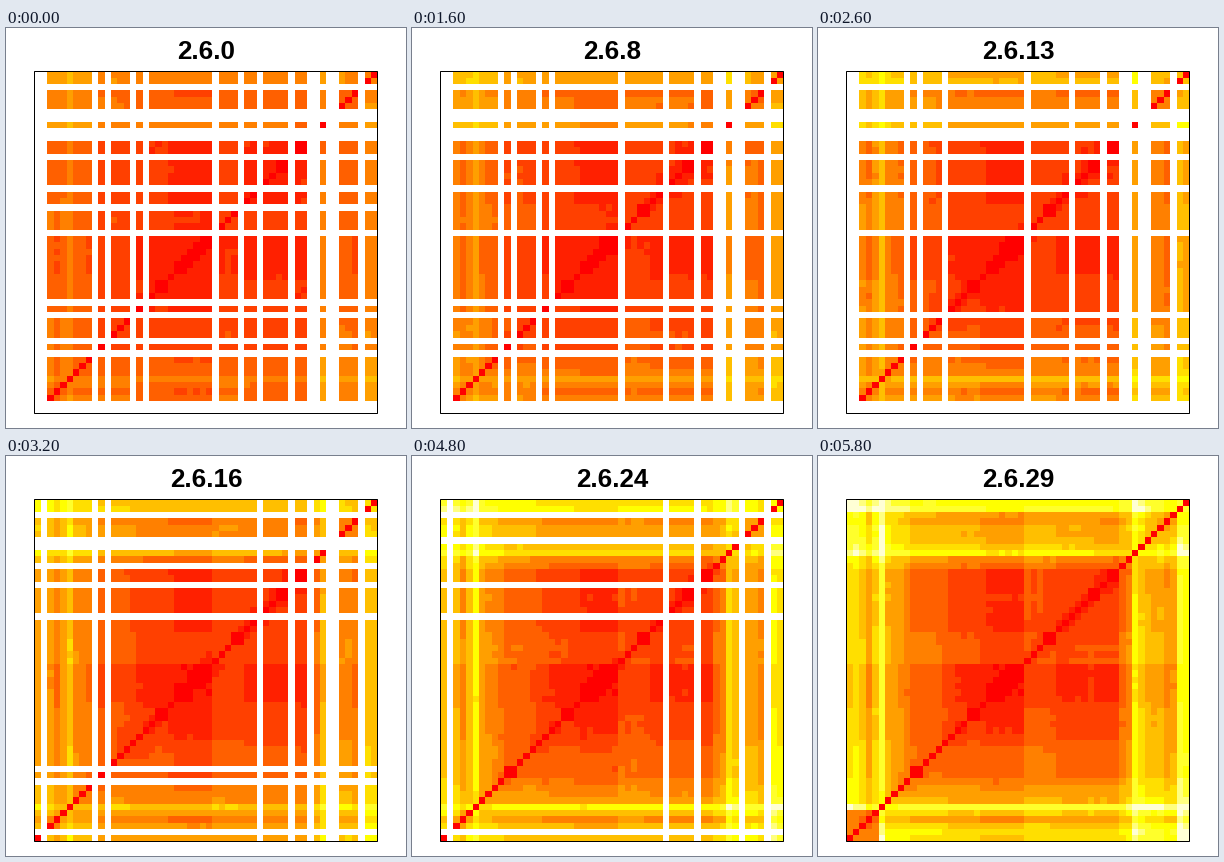
A matplotlib script for the animation above (8000 ms loop, 400x400 px).

```python
import numpy as np
import matplotlib.pyplot as plt
from matplotlib.animation import FuncAnimation
from matplotlib.colors import ListedColormap
from matplotlib.patches import Rectangle

SIZE, DPI = 400, 100
N = 54
LAST = 29          # final version; held until the loop ends
STEPS, STEP_MS = 40, 200
LEFT, RIGHT, TOP, BOTTOM = 28.8, 371.2, 43.2, 385.6

# Key points of the final distance from the common core, by item.
KEYS = [(0, 7.2), (1, 8), (3, 4.5), (4, 6.4), (5, 9.2), (6, 5.6), (8, 4.5),
        (10, 3.2), (14, 3.1), (16, 2.0), (20, 1.8), (22, 0.8), (27, 0.75),
        (28, 2.4), (32, 2.4), (33, 1.7), (42, 1.6), (43, 3.5), (44, 4.4),
        (45, 8), (46, 6.8), (48, 5.2), (49, 6), (50, 4.6), (51, 4.8),
        (52, 8.6), (53, 8.3)]
# Items that first appear in a later version.
ARRIVALS = {5: [32], 11: [17], 14: [0], 15: [15, 28], 16: [44], 17: [43],
            18: [9, 11], 19: [46], 25: [47], 26: [1, 35], 27: [40], 28: [51]}
TWINS = (10, 19, 31, 38, 41)   # items identical to their next neighbour

items = np.arange(N)
rng = np.random.default_rng(26)


def symmetric_noise(scale):
    m = np.triu(rng.normal(0, scale, (N, N)))
    return m + m.T


final = np.interp(items, *zip(*KEYS)) * rng.normal(1, 0.03, N)
noise = symmetric_noise(0.05)
gap = np.abs(np.subtract.outer(items, items))
closeness = 1 - 0.32 * np.exp(-gap / 3)

first = np.zeros(N)
for version, arrived in ARRIVALS.items():
    first[arrived] = version


def heat_colors(n):
    pale = n // 4
    ramp = n - pale
    hot = [(1, k / (ramp - 1), 0) for k in range(ramp)]
    light = [(1, 1, b) for b in np.linspace(0.5 / pale, 1 - 0.5 / pale, pale)]
    return ListedColormap(hot + light)


def levels(version):
    t = version / LAST
    a = final ** (0.67 + 0.33 * t)     # outliers drift away fastest
    p = 1.8
    d = np.add.outer(a ** p, a ** p) ** (1 / p) * closeness + noise
    if version >= 25:
        d[:5, :5] *= 0.55              # the first items form a family
    for i in TWINS:
        d[i, i + 1] = d[i + 1, i] = 0
    np.fill_diagonal(d, 0)
    missing = first > version
    hidden = missing[:, None] | missing
    return np.ma.array(np.clip(np.floor(d), 0, 11), mask=hidden)


fig = plt.figure(figsize=(SIZE / DPI, SIZE / DPI), dpi=DPI, facecolor="white")
ax = fig.add_axes([0, 0, 1, 1])
ax.axis("off")

x_edges = np.round(np.linspace(LEFT, RIGHT, N + 1))
y_edges = np.round(np.linspace(BOTTOM, TOP, N + 1))
cmap = heat_colors(12)
cmap.set_bad("white")
mesh = ax.pcolormesh(x_edges, y_edges, levels(0), cmap=cmap, vmin=-0.5,
                     vmax=11.5, antialiased=False, edgecolors="none")
ax.add_patch(Rectangle((28.5, 43.5), 343, 342, fill=False, ec="black",
                       lw=72 / DPI, snap=False, zorder=3))
title = ax.text(200, 31, "", ha="center", va="baseline", weight="bold",
                family="Liberation Sans", size=26 * 72 / DPI)
ax.set_xlim(0, SIZE)
ax.set_ylim(SIZE, 0)


def update(step):
    version = min(step, LAST)
    mesh.set_array(levels(version))
    title.set_text(f"2.6.{version}")
    return mesh, title


anim = FuncAnimation(fig, update, frames=STEPS, interval=STEP_MS,
                     repeat=True, repeat_delay=0)
plt.show()
```
